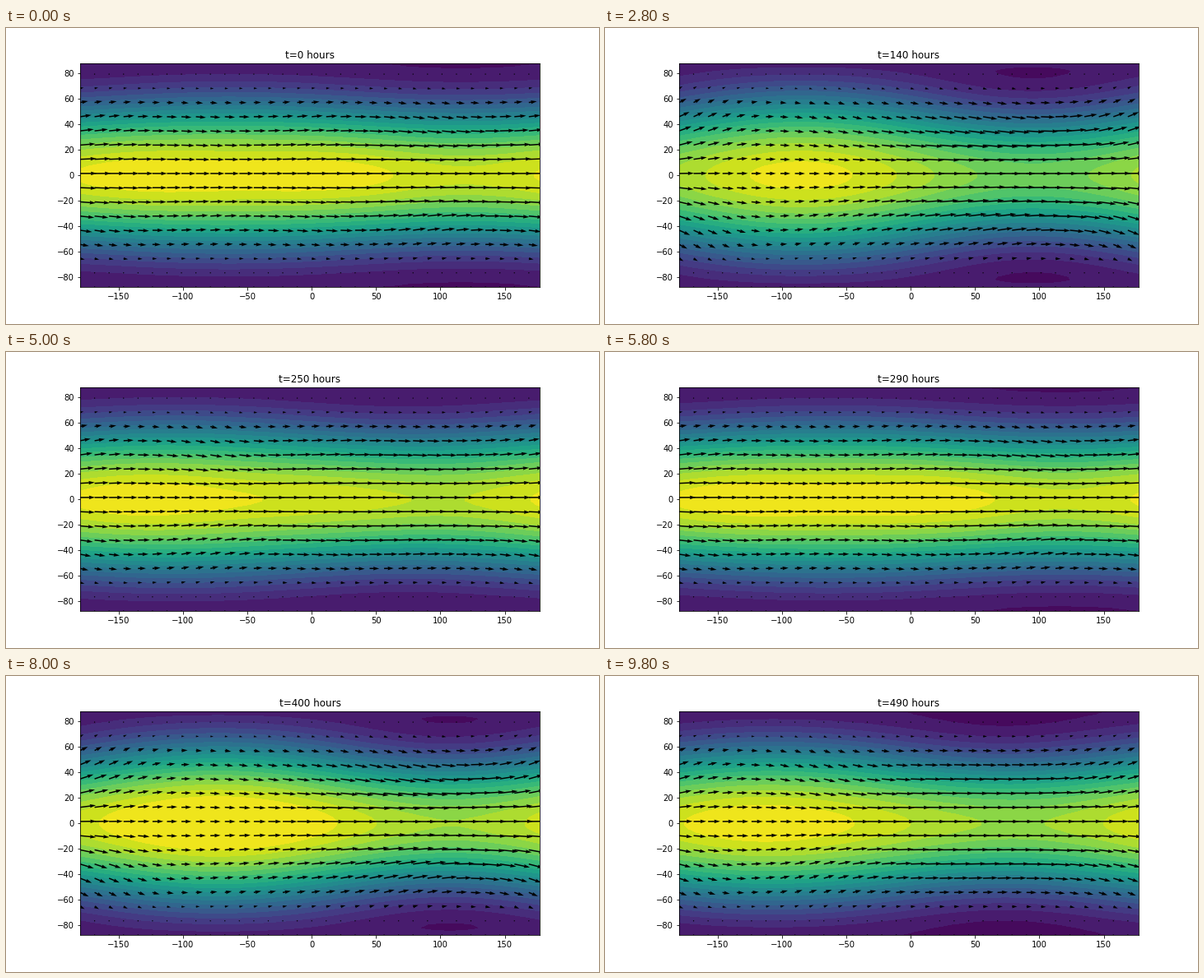
A matplotlib script that plays this animation: 720 px wide and 360 px high, repeating every 10 s.

```python
import numpy as np
import matplotlib.pyplot as plt
from matplotlib.animation import FuncAnimation

FRAMES, STEP_MS, HOURS = 50, 200, 10
PERIOD = 290          # hours for one turn of the travelling wave
ALIGNED = 130         # hour when travelling and standing waves line up
BANDS = 20

plt.rcParams.update({"figure.dpi": 72, "font.size": 10})

# Gaussian grid, in degrees and radians
lon = np.linspace(-180, 180, 129)[:-1]
lat = np.degrees(np.arcsin(np.polynomial.legendre.leggauss(64)[0]))
X, Y = np.meshgrid(lon, lat)
lam, phi = np.radians(X), np.radians(Y)
sin, cos = np.sin(phi), np.cos(phi)
jet = cos * (1 - sin**12)

levels = np.linspace(0, 1, BANDS + 1)
colors = plt.get_cmap("viridis")((np.arange(BANDS) + 0.5) / BANDS)

# Slow drift of the zonal mean at the equator and at the poles
KEY_T = [0, 60, 140, 200, 290, 350, 400, 450, 490]
EQUATOR = [0.966, 0.900, 0.873, 0.913, 0.968, 0.915, 0.952, 0.900, 0.920]
POLE = [0.0500, 0.0572, 0.0676, 0.0577, 0.0500, 0.0580, 0.0675, 0.0560, 0.0497]


def wave(center, angle=lam, n=1):
    return np.cos(n * (angle - np.radians(center)))


def turn(t):
    return 2 * np.pi * (ALIGNED - t) / PERIOD


def planet_wave(t):
    """Amplitude and crest longitude of standing plus westward wave."""
    z = 0.067 * (1 + 0.5 * np.exp(1j * turn(t)))
    return abs(z), -81 + np.degrees(np.angle(z))


def height(t):
    amp, crest = planet_wave(t)
    top, pole = np.interp(t, KEY_T, EQUATOR), np.interp(t, KEY_T, POLE)
    field = pole + (top - pole) * cos**2
    field += amp * cos * (1 + 1.8 * sin**2) * wave(crest)
    double = 0.008 * (1 + np.cos(2 * np.pi * t / PERIOD))
    field += double * cos**4 * wave(30, n=2)
    return np.clip(field, 0.001, 0.999)


def wind(t):
    """Wind components as arrow lengths in pixels."""
    amp, crest = planet_wave(t)
    u = 20 * jet - 80 * amp * cos * jet * wave(crest - 20)
    moving = 5 + np.degrees(turn(t))
    v = -2.3 * (wave(5) + 0.85 * wave(moving)) + 1.7 * wave(0, n=2)
    return u, 2 * sin * jet * v


fig, ax = plt.subplots(figsize=(10, 5))
fig.subplots_adjust(left=0.125, right=0.9, bottom=0.125, top=0.88)
thin = (slice(None, None, 4), slice(None, None, 4))


def draw(i):
    t = i * HOURS
    ax.clear()
    ax.contourf(X, Y, height(t), levels=levels, colors=colors)
    u, v = wind(t)
    ax.quiver(X[thin], Y[thin], u[thin], v[thin], scale=558,
              scale_units="width")
    ax.set_xlim(lon[0], lon[-1])
    ax.set_ylim(lat[0], lat[-1])
    ax.set_title(f"t={t} hours")
    return []


anim = FuncAnimation(fig, draw, frames=FRAMES, interval=STEP_MS,
                     init_func=lambda: draw(0), repeat=True, repeat_delay=0)
plt.show()
```
